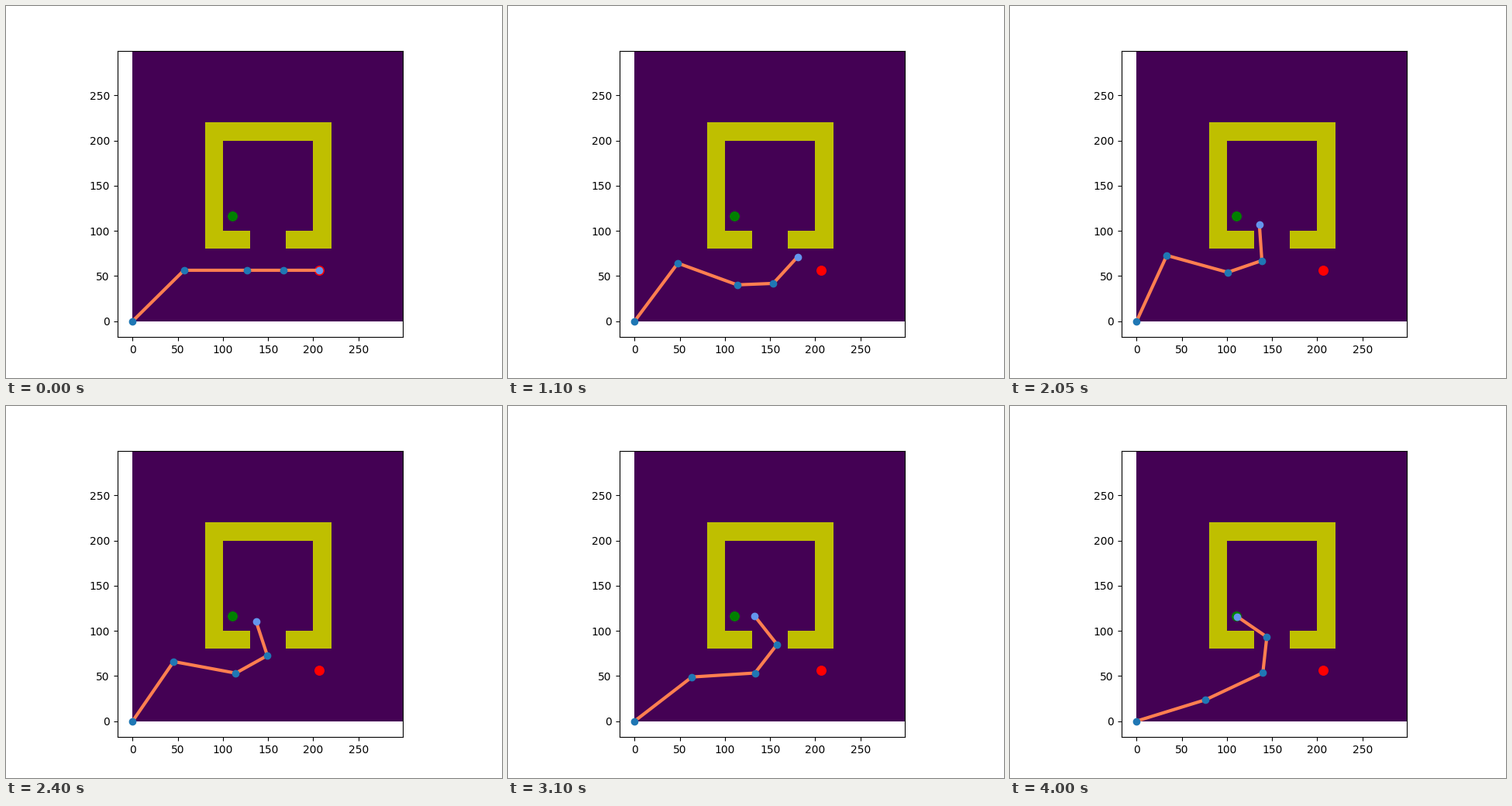
A matplotlib script that plays this animation: 640x480 px, repeating every 4100 ms.

```python
import numpy as np
import matplotlib.pyplot as plt
from matplotlib.animation import FuncAnimation
from matplotlib.patches import Rectangle

STEP_MS = 50
FRAMES = 82
SIZE = 300
LINKS = np.array([80, 70, 40, 40])
GOAL = 110.4, 116.3
FLOOR = plt.get_cmap("viridis")(0)

# (step, relative joint angles in radians); the arm turns evenly in between
ROUTE = [
    (0, (0.78, -0.78, 0, 0)),
    (10, (0.79, -1.10, 0.15, 0.36)),
    (22, (0.93, -1.28, 0.39, 0.79)),
    (33, (0.99, -1.31, 0.45, 1.05)),
    (41, (1.14, -1.41, 0.60, 1.31)),
    (54, (0.82, -0.93, 0.77, 1.44)),
    (79.4, (0.30, 0.14, 1.02, 1.08)),
]
STEPS, POSES = zip(*ROUTE)


def joints(step):
    """Positions of the base, the joints and the tip."""
    angles = [np.interp(step, STEPS, turn) for turn in zip(*POSES)]
    heading = np.cumsum(angles)
    x = np.cumsum(LINKS * np.cos(heading))
    y = np.cumsum(LINKS * np.sin(heading))
    return np.append(0, x), np.append(0, y)


def block(left, bottom, right, top, color):
    ax.add_patch(Rectangle((left, bottom), right - left, top - bottom,
                           facecolor=color, linewidth=0))


def dot(color, size, x=(), y=()):
    return ax.plot(x, y, "o", color=color, markersize=size)[0]


fig, ax = plt.subplots(figsize=(6.4, 4.8), dpi=100)
ax.imshow(np.zeros((SIZE, SIZE)), origin="lower", cmap="viridis")
ax.set_xlim(-16.95, SIZE - 0.5)
ax.set_ylim(-17.73, SIZE - 0.5)

# A walled room with a door in the lower side
block(80, 80, 220, 220, "y")
block(100, 100, 200, 200, FLOOR)
block(130, 80, 170, 100, FLOOR)

start_x, start_y = joints(0)
dot("red", 8.3, start_x[-1:], start_y[-1:])
dot("green", 8.3, GOAL[:1], GOAL[1:])

arm, = ax.plot([], [], color="coral", linewidth=3)
pivots = dot("tab:blue", 6)
tip = dot("cornflowerblue", 6)


def update(step):
    x, y = joints(step)
    arm.set_data(x, y)
    pivots.set_data(x[:-1], y[:-1])
    tip.set_data(x[-1:], y[-1:])
    return arm, pivots, tip


anim = FuncAnimation(fig, update, frames=FRAMES, interval=STEP_MS,
                     repeat=True, repeat_delay=0)
plt.show()
```
